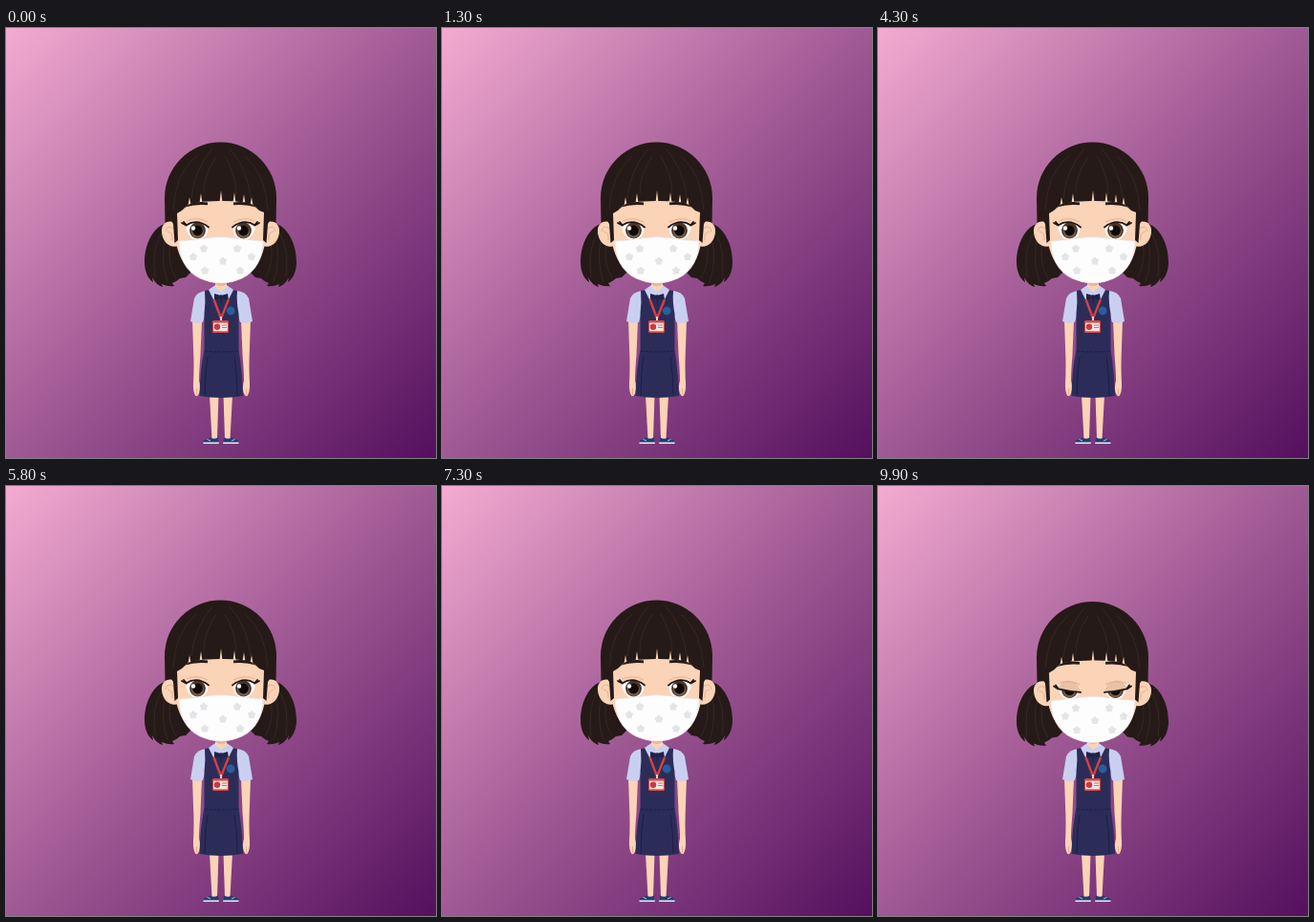
An HTML page that plays this animation: 450x450 px, repeating every 10 s.

```html
<!DOCTYPE html>
<html lang="en">
<head>
<meta charset="utf-8">
<title>Schoolgirl with mask</title>
<style>
html, body { margin: 0; width: 100%; height: 100%; overflow: hidden; }
body { background: linear-gradient(135deg, #f4abd1 0%, #9f5994 50%, #540f5e 100%); }
svg { display: block; width: 100vw; height: 100vh; }
.hair { fill: #251a17; }
.strand { fill: none; stroke: #40312b; stroke-width: .6; }
.skin { fill: #fbd3b7; }
.fold { fill: none; stroke: #d9a184; stroke-width: .7; }
.shirt { fill: #c9cff0; }
.navy { fill: #2b2d58; }
.seam { fill: none; stroke: #191b40; stroke-width: .8; }
.lash { fill: none; stroke: #211512; stroke-width: 1.8; stroke-linecap: round; stroke-linejoin: round; }
</style>
</head>
<body>
<svg viewBox="0 0 450 450" preserveAspectRatio="none">
  <defs>
    <path id="eye" d="M188 207Q200 199 211.5 209Q212 219 202 222Q190 222 188 207Z"/>
    <clipPath id="eyeClip">
      <use href="#eye"/><use href="#eye" transform="translate(449 0) scale(-1 1)"/>
    </clipPath>

    <g id="tail">
      <path class="hair" d="M166 205C154 209 145 226 145 245C145 255 149 263 154 266L153 261Q157 269 164 271L163 268Q170 271 176 270L174 267Q179 265 182 262L188 261L195 254L182 212Z"/>
      <path class="strand" d="M163 214Q152 232 156 261M167 218Q161 242 169 266M172 224Q168 246 178 262"/>
    </g>
    <g id="ear">
      <path class="skin" d="M178 204C169 200 162 205 163 214C164 224 171 231 181 228Z"/>
      <path class="fold" d="M176 210Q168 205 167 213M169 213Q175 214 174 222"/>
    </g>
    <g id="leg">
      <path class="skin" d="M213 384H222.5L221 430H215.5Z"/>
      <path d="M214 428.5Q217 431 222 428.5L222.5 434H206.5Q206 431 211 430Z" fill="#243c70"/>
      <path d="M206.5 434.3H222.8" stroke="#eef1f8" stroke-width="1.5"/>
      <path d="M210.5 430.5L214 432" stroke="#dce4f2" stroke-width=".8"/>
    </g>
    <g id="arm">
      <path class="skin" d="M195 305H205L203.5 342Q202 360 202 369Q204 376 202.5 381Q201 386 198.5 385Q195.5 381 196 371Q197 356 196 334Z"/>
      <path class="fold" d="M199.5 377V384"/>
    </g>
    <path id="sleeve" class="shirt" d="M209 275Q200 276 197 283L193 307Q199 310 206 308L212 286Z"/>
  </defs>

  <use href="#leg"/><use href="#leg" transform="translate(450 0) scale(-1 1)"/>
  <g id="arms">
    <use href="#arm"/><use href="#arm" transform="translate(451 0) scale(-1 1)"/>
  </g>

  <g id="body">
    <path class="navy" d="M207.5 337H243.5Q247 358 248 385Q225 389 202.5 385Q203 358 207.5 337Z"/>
    <path class="seam" d="M211 344Q208 363 208 385M239 344Q242 363 242 385"/>
    <use href="#sleeve"/><use href="#sleeve" transform="translate(451 0) scale(-1 1)"/>
    <path class="navy" d="M208 275Q225 271 242 275Q241 286 243.5 299V338Q225 340 207.5 338V299Q209 286 208 275Z"/>
    <path class="seam" d="M208 338Q225 340 243 338" stroke-dasharray="3 1.5"/>
    <path class="shirt" d="M212 274L219 269H231L238 274L233 284L225 279L217 284Z"/>
    <path class="skin" d="M219 262H231V271L225 276L219 271Z"/>
    <path d="M219 268Q225 272 231 268V264H219Z" fill="#e9b49b"/>
    <path d="M218 278L225 280L232 278L233 285L226 283L225 291L224 283L218 285Z" fill="#202248"/>
    <path d="M217.5 284L225 304L233 284" fill="none" stroke="#d54145" stroke-width="2.4"/>
    <circle cx="235.2" cy="296" r="4.4" fill="#285e9f"/>
    <path d="M225 302V307" stroke="#d9d7df" stroke-width="2"/>
    <rect x="216" y="306" width="17" height="13" rx="1.5" fill="#d84744"/>
    <rect x="217.2" y="308.5" width="14.6" height="8.8" fill="#fae4e1"/>
    <circle cx="221" cy="312.8" r="3.2" fill="#c73a3e"/>
    <path d="M226 311H231M226 313.5H231" stroke="#d66b68" stroke-width="1"/>
  </g>

  <g id="head">
    <use href="#tail"/><use href="#tail" transform="translate(449 0) scale(-1 1)"/>
    <path class="hair" d="M166.5 206L166 178A58.5 58.5 0 0 1 283 178L282.5 206L270 212H179Z"/>
    <use href="#ear"/><use href="#ear" transform="translate(449 0) scale(-1 1)"/>
    <path class="skin" d="M177.5 165H271.5L271 225C267 252 247 267 225 267C203 267 183 252 178 225Z"/>

    <g clip-path="url(#eyeClip)">
      <path d="M185 198H265V224H185Z" fill="#fff"/>
      <g id="irises"></g>
    </g>
    <g id="lidL"></g>
    <g id="lidR" transform="translate(449 0) scale(-1 1)"></g>

    <path id="brow" class="hair" d="M187.5 187.5Q195 180.5 211 182.5L211 185.3Q198 184 187.5 187.5Z"/>
    <use href="#brow" transform="translate(449 0) scale(-1 1)"/>
    <path id="fringe" class="hair"/>
    <path class="strand" d="M216 126Q197 148 194 178M220 134Q206 156 207 174M229 134Q241 155 241 174M234 126Q253 147 256 178M199 134Q177 153 175 190M250 134Q272 153 274 190"/>

    <path d="M181 223Q202 221.5 213 219.5Q225 218 237 219.5Q248 221.5 269 223C269 240 262 255 247 262Q236 267 225 267Q214 267 203 262C188 255 181 240 181 223Z" fill="#fdfdfd" stroke="#e4dfe4" stroke-width=".6"/>
    <g id="flowers" fill="#e4e4e8"></g>
  </g>
</svg>

<script>
const LOOP = 10000;
const $ = id => document.getElementById(id);

// Five-petal pattern on the mask
const petals = Array.from({ length: 5 }, (_, i) => {
  const a = i * Math.PI * 2 / 5 - Math.PI / 2;
  return `<circle cx="${2.5 * Math.cos(a)}" cy="${2.5 * Math.sin(a)}" r="1.7"/>`;
}).join("") + '<circle r="1.4"/>';
const spots = [[207, 231], [242, 231], [196, 239.5], [227, 244], [257, 239.5], [208, 254], [245, 254]];
$("flowers").innerHTML = spots.map(([x, y]) =>
  `<g transform="translate(${x} ${y})">${petals}</g>`).join("");

$("irises").innerHTML = [200.5, 248.5].map(x => `
  <circle cx="${x}" cy="212" r="8.4" fill="#4b3529"/>
  <circle cx="${x}" cy="213.5" r="6.6" fill="#765a45"/>
  <circle cx="${x}" cy="212" r="5.4" fill="#100b0a"/>
  <circle cx="${x - 4.5}" cy="209.5" r="2.2" fill="#fff"/>`).join("");

// Fringe hem from right to left, cut by narrow [x, top] slits
const slits = [[257, 177], [249, 174], [239, 172], [225, 170], [204, 173], [192, 177]];
const hem = x => 181 + Math.pow(Math.abs(x - 224.5) / 47, 3) * 10;
const cuts = slits.map(([x, top]) =>
  `L${x + 1.3} ${hem(x + 1.3)}L${x} ${top}L${x - 1.3} ${hem(x - 1.3)}`).join("");
$("fringe").setAttribute("d",
  `M168 194C168 158 187 135 224.5 132C262 135 281 158 281 194L274 205L272.5 225L269 222L270 193L265 191${cuts}L184 191L179 194L180 222L176.5 225L175 205Z`);

const lids = ["lidL", "lidR"].map(id => {
  $(id).innerHTML = '<path fill="#e8c2a3"/><path class="fold"/><path class="lash"/>';
  return [...$(id).children];
});

const mix = (a, b, k) => a + (b - a) * k;

// Smooth bump of 0..1 around a moment
function pulse(t, mid, half) {
  const d = Math.min(1, Math.abs(t - mid) / half);
  return (1 + Math.cos(Math.PI * d)) / 2;
}
const pulses = (t, mids, half) => Math.max(...mids.map(m => pulse(t, m, half)));

const NODS = [600, 8300, 9880];   // head dips while the eyes close
const BLINKS = [5000];            // eyes only
const LIFTS = [1750, 4050, 6980]; // small rise of the head

function drawLids(k) {
  const outer = mix(204, 208, k), corner = mix(206.5, 211, k);
  const bend = mix(199, 214, k), inner = mix(208.5, 214.5, k);
  const edge = `Q200 ${bend} 212 ${inner}`;
  for (const [lid, crease, lash] of lids) {
    lid.setAttribute("d", `M188 ${corner}${edge}Q211 ${mix(207, 204, k)} 200 202Q191 202 188 ${corner}Z`);
    lid.setAttribute("opacity", Math.min(1, k * 4));
    crease.setAttribute("d", `M189 ${mix(202, 205, k)}Q199 ${mix(197, 201, k)} 211 ${mix(203, 206, k)}`);
    lash.setAttribute("d", `M184 ${outer}L188.5 ${corner}${edge}M186 ${outer - 1}L189 ${corner}`);
  }
}

function frame(now) {
  const t = now % LOOP;
  const nod = pulses(t, NODS, 200);
  const lift = pulses(t, LIFTS, 220);
  drawLids(Math.max(nod, pulses(t, BLINKS, 200)));
  $("head").setAttribute("transform", `translate(0 ${1.6 * nod - .8 * lift})`);
  $("arms").setAttribute("transform", `translate(0 ${.3 * lift})`);
  requestAnimationFrame(frame);
}
frame(performance.now());
</script>
</body>
</html>
```
